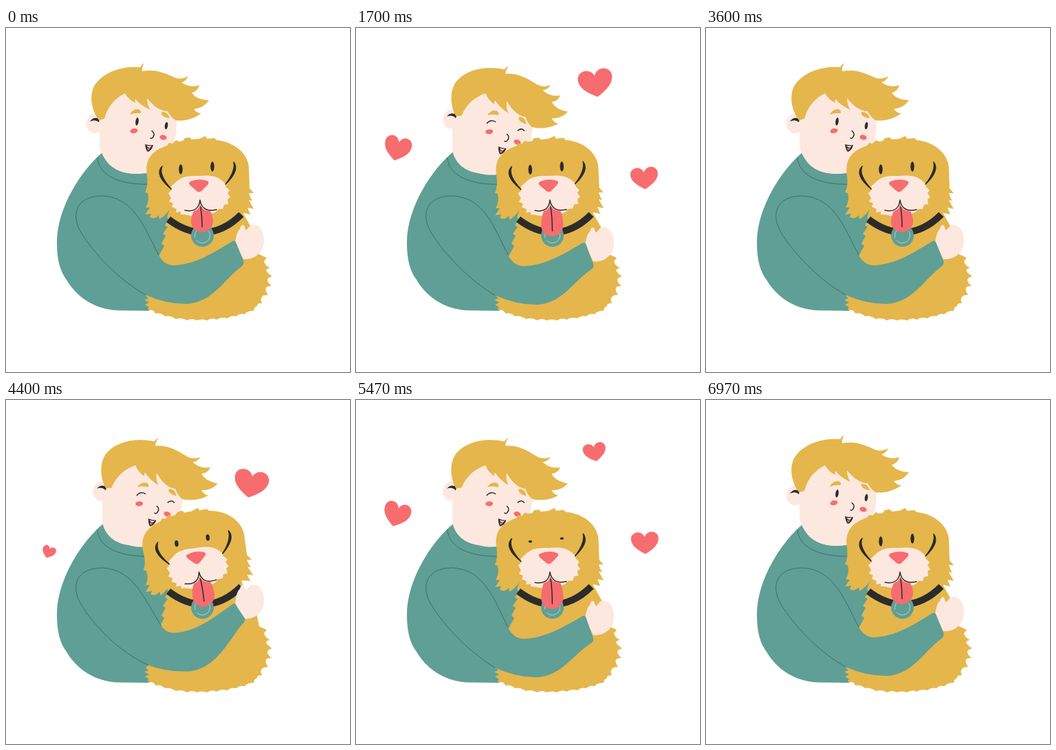
These frames come from a looping animation (500 px wide and 500 px high, 7.03 s). An HTML page:

```html
<!DOCTYPE html>
<html lang="en">
<head>
<meta charset="utf-8">
<title>Dog hug</title>
<style>
  html, body { margin: 0; height: 100%; overflow: hidden; background: #fff; }
  svg { display: block; width: 100vw; height: 100vh; }
  .gold { fill: #e5b64b; }
  .skin { fill: #fde8df; }
  .teal { fill: #5f9f95; }
  .red { fill: #f76c6f; }
  .dark { fill: #2b2b2b; }
  .line { fill: none; stroke: #2b2b2b; stroke-width: 1.5; stroke-linecap: round; stroke-linejoin: round; }
  .seam { fill: none; stroke: #3d6f69; stroke-width: 1; }
  .fold { fill: #2b2b2b; stroke-width: 1.6; }
</style>
</head>
<body>
<svg viewBox="0 0 500 500">
  <path class="teal" d="M141 180C111 205 74 260 74 312C74 338 79 354 88 366C100 387 126 410 165 410.500L207 411L260 390V200Z"/>
  <path class="seam" d="M133 188C134 214 165 229 212 227"/>
  <path class="skin" d="M140 145V178C144 198 161 212 190 212L205 211V140Z"/>

  <g id="head">
    <ellipse class="skin" cx="129" cy="139" rx="12" ry="14"/>
    <path class="skin" d="M136 120V172C142 197 160 212 190 212C225 211 249 185 248 130L205 85L160 90Z"/>
    <path class="dark" d="M122 136Q127 128 136 132L135 137Q130 132 122 136Z"/>
    <path class="gold" d="M135 134C123 118 121 96 129 83C143 62 172 55 195 57Q197 53 201 51Q197 57 198 63C215 59 230 65 243 71C251 75 258 74 265 70Q262 77 255 79C263 85 272 86 281 83Q279 92 270 94Q276 104 295 105Q288 116 273 118Q278 124 284 124C272 133 256 136 246 134Q239 129 235 121Q220 121 205 102Q205 112 210 119Q196 113 188 103Q187 106 188 109Q178 104 173 95C159 102 148 113 143 132Z"/>
    <path class="gold" d="M180 126Q184 117 193 118Q198 121 195 124Q187 123 180 126ZM226 122Q235 121 238 131Q231 131 226 126Z"/>
    <g id="openEyes" class="dark">
      <ellipse cx="190.500" cy="136" rx="2.200" ry="5.800" transform="rotate(8 190.500 136)"/>
      <ellipse cx="233" cy="142" rx="2.200" ry="5.400" transform="rotate(8 233 142)"/>
    </g>
    <path id="shutEyes" class="line" d="M181 138Q185 131 193 134M227 142Q232 137 236 141"/>
    <ellipse class="red" cx="186" cy="149.500" rx="5.500" ry="3.500" transform="rotate(-12 186 149.500)"/>
    <ellipse class="red" cx="228.500" cy="159" rx="5.200" ry="3.600" transform="rotate(12 228.500 159)"/>
    <path class="line" d="M212 149.500Q217 153 214 158Q213 161 210 160"/>
    <path class="dark" d="M202 169Q208 171 214 170Q212 178 206 180Q203 177 202 169Z"/>
    <path fill="#fff" d="M204 171Q208 172 212 171L209 174Q206 174 204 171Z"/>
    <path class="red" d="M205 174Q208 175 210 174Q208 178 206 178Z"/>
  </g>

  <path class="gold" d="M238 262L234 275L236 278L231 287L235 289L228 299L232 302L226 313L230 317L221 333L238 360L203 389L207 393L201 395L208 399L202 402L208 406Q205 407 207 410Q215 409 217 415Q225 413 231 419Q238 417 247 423Q256 420 263 425Q270 421 277 425Q285 422 292 425Q300 420 306 424Q313 419 322 422Q327 417 335 419Q339 414 347 416Q350 411 360 411Q360 406 365 404Q364 400 372 400Q369 394 372 391Q373 388 381 388Q376 381 378 377Q380 375 386 375Q379 369 380 365Q382 362 387 361Q379 356 378 352Q380 349 384 349Q376 345 375 339L379 334L368 329L362 300L344 268L336 245H250Z"/>
  <path fill="none" stroke="#2b2b2b" stroke-width="10" d="M236 278Q261 297 286 297Q316 297 342 271"/>
  <circle class="teal" cx="285.500" cy="301.500" r="16.500"/>
  <circle cx="285.500" cy="301.500" r="11" fill="none" stroke="#b9d3c6" stroke-width="1" stroke-dasharray="27 4"/>

  <path id="hand" class="skin" d="M333 312Q335 296 340 292Q342 285 346 287Q347 292 349 294Q352 291 355 287C368 282 376 297 375 311C374 326 362 337 345 336Z"/>
  <path id="sleeve" class="teal"/>
  <path id="seam" class="seam"/>

  <g id="dog">
    <path class="gold" d="M257 164L260 160L267 159L270 162L281 161L290 157L292 161L303 160L306 163C330 165 351 181 353 202L354 233L360 240L353 240Q355 247 358 251L353 250L360 263L351 261L355 271L346 269Q339 270 334 265L315 268H253L247 266L238 263Q233 272 223 278L222 272Q216 279 209 275L211 270L202 271Q207 264 209 261L203 261Q209 250 206 240L202 239Q207 229 205 215C201 190 213 178 234 171L237 167L242 168L247 163L251 165Z"/>
    <path class="skin" d="M249 222C259 214 270 215 281 215C292 214 304 214 313 221L320 227L319 230L325 236L322 240L326 246L322 249L323 256L317 257L315 263L309 263L304 268Q281 277 259 271L254 271V267L247 268L248 263L241 260L243 255L237 252L240 247L236 240L241 235L240 230Z"/>
    <path id="tongue" class="red"/>
    <path id="groove" class="line"/>
    <path class="line" d="M260 265Q280 269 282 250Q285 269 306 264"/>
    <path class="red" d="M268 223Q280 218 292 222Q297 224 292 229L284 237Q280 240 276 236L268 229Q264 225 268 223Z"/>
    <ellipse id="eyeL" class="dark" cx="254" cy="205.500" rx="2.700"/>
    <ellipse id="eyeR" class="dark" cx="300" cy="201.500" rx="2.700"/>
    <path class="line fold" d="M227 201Q215 213 240 234Q221 213 227 201ZM331 195Q340 207 319 227Q334 208 331 195Z"/>
  </g>
  <g id="hearts" class="red"></g>
</svg>

<script>
const $ = id => document.getElementById(id);
const set = (id, name, value) => $(id).setAttribute(name, value);
const clamp = v => Math.max(0, Math.min(1, v));

// Eased interpolation through [step, value] pairs
function key(p, points) {
  let [t0, v0] = points[0];
  for (const [t, v] of points) {
    if (p < t) {
      const u = clamp((p - t0) / (t - t0));
      return v0 + (v - v0) * u * u * (3 - 2 * u);
    }
    [t0, v0] = [t, v];
  }
  return v0;
}

const headTilt = [[2, 0], [11, 7.8], [13, 8.4], [24, 7.8], [27, 7.8], [36, -1], [42, 0]];
const armLift = [[1, 0], [5, -0.2], [12, 1], [23, -0.3], [26, -0.3], [30, -0.15], [36, 0]];
const dogTilt = [[2, 0], [11, -6], [13, -4], [22, -0.6], [30, -0.8], [35, 0]];
const dogEye = [[8, 7.2], [10, 3], [11, 4.6], [13, 6.2], [15, 7.2], [21, 7.2], [24, 1.7], [27, 7.2]];
const pant = [[3, 0], [11, 4], [13, 2], [24, 7], [30, 0]];

const hearts = [
  { size: 1, tall: 1, born: 9.4, dies: 26, y: 122, rise: 53.5, tau: 6.6,
    x: [[11, 356], [13, 355], [24, 347]], turn: [[11, 11], [13, -3], [24, -10]] },
  { size: 0.79, tall: 1.12, born: 10.2, dies: 28.8, y: 221, rise: 94, tau: 15,
    x: [[11, 62], [13, 65], [24, 59]], turn: [[11, 20], [13, 4], [24, 17]] },
  { size: 0.8, tall: 1, born: 12.1, dies: 29.8, y: 278, rise: 111, tau: 13,
    x: [[13, 416], [24, 420]], turn: [[13, -14], [24, -3]] },
];
const heartShape = 'M0 20C-14 12-25 4-25-8C-25-21-6-25 0-11C6-25 25-21 25-8C25 4 14 12 0 20Z';
$('hearts').innerHTML = hearts.map(() => `<path d="${heartShape}"/>`).join('');

function drawArm(a) {
  const m = (rest, up) => rest + (up - rest) * a;
  const top = `${m(222, 226)} ${m(330, 328)}`;
  const low = `${m(203, 207)} ${m(388, 385)}`;
  set('sleeve', 'd', `M190 280L${top}Q${m(230, 233)} ${m(345, 338)} 244 ${m(345, 338)}` +
    `C275 ${m(344, 337)} 303 ${m(326, 315)} 329 ${m(310, 296)}Q332 ${m(308, 293)} 334 ${m(311, 297)}` +
    `L${m(345, 348)} ${m(338, 317)}Q347 ${m(343, 321)} 342 ${m(347, 326)}` +
    `C${m(318, 326)} ${m(364, 346)} ${m(300, 304)} ${m(400, 394)} 262 ${m(401, 394)}Q232 ${m(401, 395)} ${low}Z`);
  set('seam', 'd', `M${top}C201 291 187 246 140 244C103 244 93 270 109 297C127 327 165 367 ${low}`);
  set('hand', 'transform', `translate(0 ${-19 * a})`);
}

function draw(p) {
  set('head', 'transform', `rotate(${key(p, headTilt)} 181 206)`);
  const shut = p >= 7 && p < 33;
  set('openEyes', 'visibility', shut ? 'hidden' : 'visible');
  set('shutEyes', 'visibility', shut ? 'visible' : 'hidden');
  drawArm(key(p, armLift));

  set('dog', 'transform', `rotate(${key(p, dogTilt)} 281 265)`);
  for (const id of ['eyeL', 'eyeR']) set(id, 'ry', key(p, dogEye));
  const end = 297 + key(p, pant);
  set('tongue', 'd', `M282 256Q285 266 297 266Q301 274 301 ${end - 16}` +
    `C300 ${end + 5} 269 ${end + 5} 269 ${end - 16}Q269 274 273 266Q281 264 282 256Z`);
  set('groove', 'd', `M283 260Q285 274 285 ${end - 8}`);

  hearts.forEach((h, n) => {
    const scale = h.size * clamp((p - h.born) / 1.6) * clamp((h.dies - p) / 3);
    const y = h.y - h.rise * (1 - Math.exp((11 - p) / h.tau));
    $('hearts').children[n].setAttribute('transform',
      `translate(${key(p, h.x)} ${y}) rotate(${key(p, h.turn)}) scale(${scale} ${scale * h.tall})`);
  });
}

// 12.5 poses per second on a 30 Hz clock; the hug repeats every 44 poses
function tick() {
  const t = performance.now() % 7030;
  const beat = Math.floor(t * 0.03 + 0.101);
  draw(Math.floor(beat * 5 / 12) % 44);
  requestAnimationFrame(tick);
}
tick();
</script>
</body>
</html>
```
